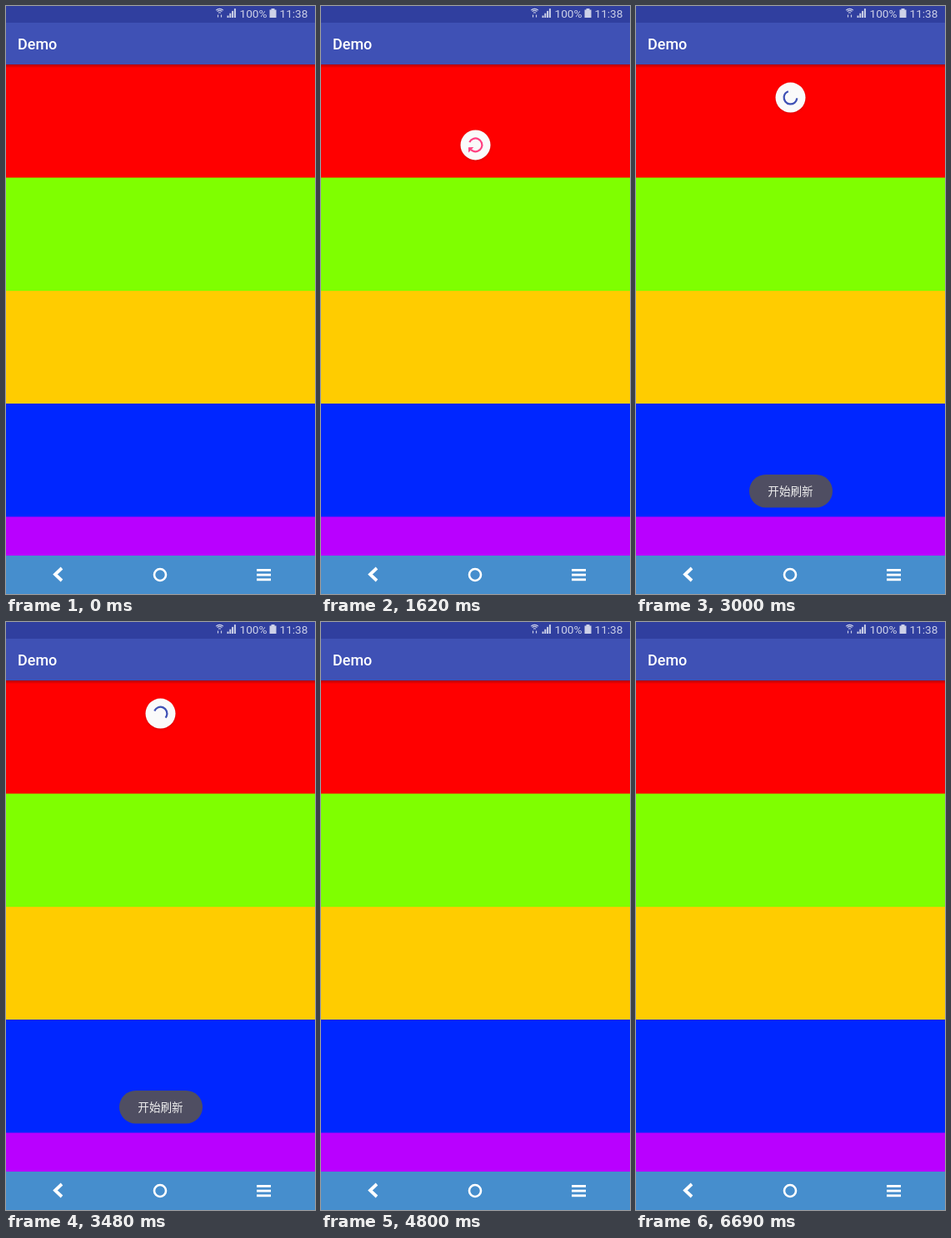
Recreate the animation shown at these times as an HTML page with a canvas. Size 371x704 px, loop 8.07 s.

```html
<!DOCTYPE html>
<html lang="zh">
<head>
<meta charset="utf-8">
<title>Pull to refresh</title>
<style>
html, body { margin: 0; width: 100%; height: 100%; overflow: hidden; }
canvas { display: block; }
</style>
</head>
<body>
<canvas id="stage" width="371" height="704"></canvas>
<script>
const ctx = document.getElementById('stage').getContext('2d');
const LOOP = 8070, DP = 0.9, TAU = Math.PI * 2;
const BAR_BOTTOM = 70, CENTER_X = 185.5;
const PINK = '#ff4081', INDIGO = '#3f51b5';

// Main gesture, in ms
const PULL = 780, RELEASE = 1760, SPIN = 1960, CYCLE = SPIN + 666, HIDE = 3630, GONE = 3780;
// Short pulls that spring back: start, release, distance in dp
const SHORT_PULLS = [[4290, 4600, 58], [5220, 5560, 60], [6120, 6490, 53]];

const clamp = (v, a = 0, b = 1) => Math.min(b, Math.max(a, v));
const progress = (t, from, to) => clamp((t - from) / (to - from));
const decelerate = p => 1 - (1 - p) ** 2;
const dragEase = p => 1 - (1 - p) ** 1.3;

function fastOutSlowIn(x) {
  let lo = 0, hi = 1, s = 0.5;
  for (let i = 0; i < 16; i++) {
    s = (lo + hi) / 2;
    if (1.2 * s * (1 - s) ** 2 + 0.6 * s * s * (1 - s) + s ** 3 < x) lo = s; else hi = s;
  }
  return 3 * s * s - 2 * s ** 3;
}

// Circle position and arc for an overscroll distance in dp
function dragged(distance, alpha) {
  const percent = Math.min(1, distance / 64);
  const arc = Math.max(percent - 0.4, 0) * 5 / 3;
  const x = clamp((distance - 64) / 64, 0, 2) / 4;
  const tension = (x - x * x) * 2;
  return {
    top: -40 + 64 * percent + 128 * tension, scale: 1, color: PINK, alpha,
    start: 0, end: arc * 0.8, arrow: arc,
    turn: (-0.25 + 0.4 * arc + tension * 2) / 2
  };
}

function spinning(t) {
  const base = { top: 24, scale: 1, alpha: 1, arrow: 0 };
  if (t < CYCLE) {
    const p = progress(t, SPIN, CYCLE);
    return { ...base, color: PINK, arrow: 1, start: 0.79 * p, end: 0.8, turn: 0.575 + 0.425 * p };
  }
  const p = (t - CYCLE) / 1332;
  const grow = 0.79 * fastOutSlowIn(clamp(p * 2));
  const shrink = 0.79 * fastOutSlowIn(clamp(p * 2 - 1));
  const hide = (1 - Math.cos(Math.PI * progress(t, HIDE, GONE))) / 2;
  return { ...base, color: INDIGO, scale: 1 - hide,
    start: 0.79 + shrink, end: 0.8 + grow, turn: (0.21 + 0.6) * p };
}

function spinnerAt(t) {
  if (t >= PULL && t < SPIN) {
    const distance = 192 * dragEase(progress(t, PULL, RELEASE));
    const state = dragged(distance, 0.3 + 0.7 * progress(t, 1034, 1334));
    state.top += (24 - state.top) * decelerate(progress(t, RELEASE, SPIN));
    return state;
  }
  if (t >= SPIN && t < GONE) return spinning(t);
  for (const [from, release, distance] of SHORT_PULLS) {
    if (t < from || t >= release + 200) continue;
    const state = dragged(distance * dragEase(progress(t, from, release)), 0.3);
    if (t > release) {
      state.top += (-40 - state.top) * decelerate(progress(t, release, release + 200));
      state.end = state.arrow = 0;
    }
    return state;
  }
  return null;
}

function rect(x, y, w, h, color) {
  ctx.fillStyle = color;
  ctx.fillRect(x, y, w, h);
}

function text(str, x, y, font, color) {
  ctx.font = font;
  ctx.fillStyle = color;
  ctx.fillText(str, x, y);
}

function line(points, width, color) {
  ctx.beginPath();
  points.forEach(([x, y]) => ctx.lineTo(x, y));
  ctx.lineWidth = width;
  ctx.strokeStyle = color;
  ctx.stroke();
}

function arc(x, y, r, from, to, width, color) {
  ctx.beginPath();
  ctx.arc(x, y, r, from, to);
  ctx.lineWidth = width;
  ctx.strokeStyle = color;
  ctx.stroke();
}

function drawRows() {
  rect(0, 70, 371, 136, '#ff0000');
  rect(0, 205.5, 371, 136, '#7fff00');
  rect(0, 341, 371, 136, '#ffcc00');
  rect(0, 476, 371, 136, '#0026ff');
  rect(0, 611.5, 371, 47, '#b900ff');
}

function drawSpinner({ top, scale, color, alpha, start, end, arrow, turn }) {
  ctx.save();
  ctx.beginPath();
  ctx.rect(0, BAR_BOTTOM, 371, 588);
  ctx.clip();
  ctx.translate(CENTER_X, BAR_BOTTOM + (top + 20) * DP);
  ctx.scale(DP * scale, DP * scale);

  ctx.save();
  ctx.shadowColor = 'rgba(0,0,0,.15)';
  ctx.shadowBlur = 3;
  ctx.shadowOffsetY = 1;
  ctx.fillStyle = '#fafafa';
  ctx.beginPath();
  ctx.arc(0, 0, 20, 0, TAU);
  ctx.fill();
  ctx.restore();

  if (end > start) {
    ctx.globalAlpha = alpha;
    arc(0, 0, 8.75, (start + turn) * TAU, (end + turn) * TAU, 2.5, color);
    ctx.rotate((end + turn) * TAU);
    ctx.fillStyle = color;
    ctx.beginPath();
    ctx.moveTo(8.75 - 5 * arrow, 0);
    ctx.lineTo(8.75 + 5 * arrow, 0);
    ctx.lineTo(8.75, 5 * arrow);
    ctx.fill();
  }
  ctx.restore();
}

function drawBars() {
  rect(0, 0, 371, 20, '#303f9f');
  rect(0, 20, 371, 50, INDIGO);
  const shade = ctx.createLinearGradient(0, 70, 0, 74);
  shade.addColorStop(0, 'rgba(0,0,0,.3)');
  shade.addColorStop(1, 'rgba(0,0,0,0)');
  rect(0, 70, 371, 4, shade);
  text('Demo', 14, 52, '500 18px Roboto, sans-serif', '#fff');

  const pale = '#cdd1e8';
  text('100%', 280.5, 14, '13.6px Roboto, sans-serif', pale);
  text('11:38', 328.5, 14, '13.6px Roboto, sans-serif', pale);
  for (const r of [2.2, 4.4, 6.6]) arc(256.5, 10, r, TAU * 0.635, TAU * 0.865, 1.1, pale);
  line([[254.5, 10.5], [254.5, 13.5]], 1.2, pale);
  line([[258.5, 10.5], [258.5, 13.5]], 1.2, pale);
  for (let i = 0; i < 4; i++) rect(265.5 + i * 2.8, 11.5 - i * 2.8, 2, 2.5 + i * 2.8, pale);
  rect(318.5, 3, 4, 2, pale);
  rect(316.5, 4.5, 8, 9.5, pale);

  rect(0, 658, 371, 46, '#468ecd');
  line([[67, 673], [59, 680.5], [67, 688]], 3.8, '#fff');
  arc(185, 681, 7, 0, TAU, 2.6, '#fff');
  for (const y of [674, 679.7, 685.4]) rect(301, y, 17, 2.8, '#fff');
}

function drawToast(t) {
  ctx.globalAlpha = progress(t, 1920, 2040) * (1 - progress(t, 4290, 4590));
  ctx.fillStyle = '#4f4e62';
  ctx.beginPath();
  ctx.roundRect(136, 561, 100, 39.5, 19.75);
  ctx.fill();
  ctx.textAlign = 'center';
  text('开始刷新', 185.5, 586, '13.6px "Noto Sans CJK SC", "Noto Sans CJK", sans-serif', '#f0f0f0');
  ctx.textAlign = 'left';
  ctx.globalAlpha = 1;
}

const began = performance.now();
function frame() {
  const t = (performance.now() - began) % LOOP;
  drawRows();
  const spinner = spinnerAt(t);
  if (spinner) drawSpinner(spinner);
  drawBars();
  drawToast(t);
  requestAnimationFrame(frame);
}
frame();
</script>
</body>
</html>
```
